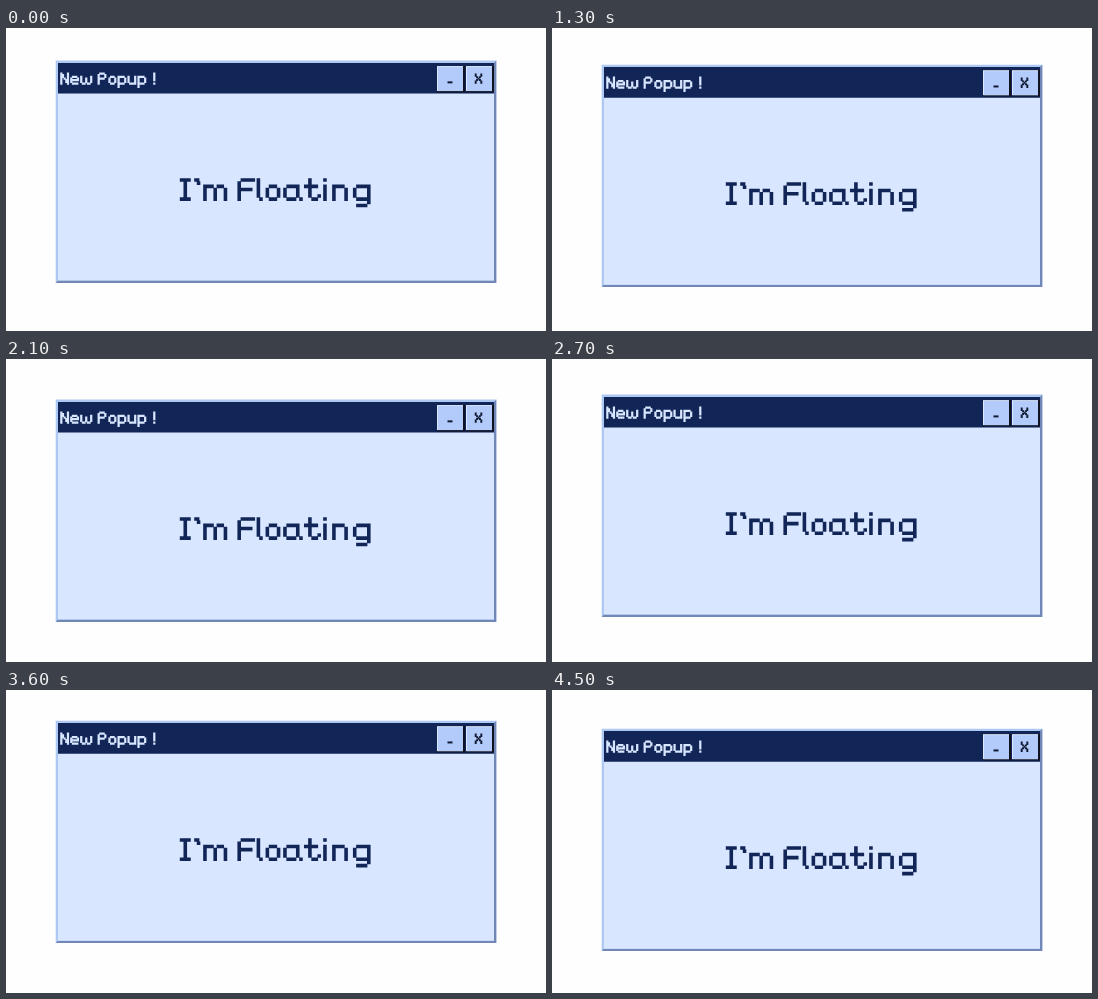
These frames come from a looping animation (540x303 px, 4.6 s). An HTML page:

```html
<!DOCTYPE html>
<html lang="en">
<head>
<meta charset="utf-8">
<title>Floating popup</title>
<style>
  html, body { margin: 0; width: 100%; height: 100%; overflow: hidden; background: #fefefe; }
  svg { display: block; width: 100%; height: 100%; }
  .pixels { fill: none; stroke-linecap: square; }
  /* selectable text lying over the pixel lettering */
  text { font-family: "DejaVu Sans Mono", monospace; fill: transparent; }
</style>
</head>
<body>
<svg viewBox="0 0 540 303">
  <g id="popup">
    <path fill="#aec8f4" d="M49.7 0h440.6v222.4h-440.6z"/>
    <path fill="#7188b6" d="M490.3 0v222.4h-440.6l2.3-2.4h436v-217.6z"/>
    <path fill="#d8e6ff" d="M52 2.4h436v217.6h-436z"/>
    <path fill="#112557" d="M52 2.4h436v30.6h-436z"/>
    <g id="buttons"></g>
    <path fill="#111a33" d="M441.5 20.8h5v2h-5z"/>
    <g id="lettering"></g>
    <text x="54" y="23.5" font-size="14.5">New Popup !</text>
    <text x="174" y="140.5" font-size="26.5">I’m Floating</text>
  </g>
</svg>
<script>
  // Pixel font: [width, strokes]; row 0 is the cap line, row 6 the baseline
  const font = {
    I: [3.5, "M0 0h2.3M0 6h2.3M1.15 0v6"],
    "’": [1.8, "M0 0h.5M.8 1h0"],
    F: [5, "M1 0h3.4M0 1v5M1 3h2.6"],
    N: [5, "M0 0v6M4 0v6M1 1v1M2 3h0M3 4v1"],
    P: [5.5, "M1 0h2M0 1v5M4 1v1M1 3h2"],
    X: [5, "M0 0v1M4 0v1M1 2h0M3 2h0M2 3h0M1 4h0M3 4h0M0 5v1M4 5v1"],
    a: [5.5, "M1 2h3M0 3v2M1 6h2M4 2v3M5 6h0"],
    e: [5, "M1 2h2M0 3v2M4 3v1M1 4h3M1 6h2.6"],
    g: [5.5, "M1 2h3.4M0 3v2M1 6h3M4.4 2v5M1 8h2.4"],
    i: [1.8, "M0 0h0M0 2v4"],
    l: [1.8, "M0 0v5M.8 6h0"],
    m: [7.2, "M0 2v4M1 2h1.2M3.2 3v3M4.2 2h1.2M6.4 3v3"],
    n: [5.5, "M0 2v4M1 2h1.8M3.8 3v3"],
    o: [4.5, "M1 2h1.5M1 6h1.5M0 3v2M3.5 3v2"],
    p: [5, "M0 2v6M1 2h2M4 3v2M1 6h2"],
    t: [5, "M1.3 0v5M0 2h3.3M2.3 6h1M4.2 5h0"],
    u: [5, "M0 2v3M1 6h2M4 2v4"],
    w: [7, "M0 2v3M1 6h1M3 3v2M4 6h1M6 2v3"],
    "!": [2, "M1 0v4M1 6h0"],
    " ": [1.5, ""]
  };

  function letters(text, x, y, cell, weight, color) {
    let pen = 0.5;
    const glyphs = [...text].map(char => {
      const [width, strokes] = font[char];
      const path = `<path transform="translate(${pen} .5)" d="${strokes}"/>`;
      pen += width + 1;
      return path;
    }).join("");
    return `<g class="pixels" stroke="${color}" stroke-width="${weight}"
      transform="translate(${x} ${y}) scale(${cell})">${glyphs}</g>`;
  }

  const button = x => `<g transform="translate(${x} 5.5)">
    <path fill="#10131f" d="M0 0h28v26.3h-28z"/>
    <path fill="#dce8ff" d="M0 0h26v25h-26z"/>
    <path fill="#b3cbfb" d="M1 1h25v24h-25z"/></g>`;

  const byId = id => document.getElementById(id);
  byId("buttons").innerHTML = button(431) + button(460);
  byId("lettering").innerHTML =
    letters("New Popup !", 54.5, 12.2, 1.66, 1.35, "#d8e6ff") +
    letters("I’m Floating", 174, 117.8, 3.2, 1.12, "#112557") +
    letters("X", 469, 13.2, 1.4, 1.4, "#111a33");

  const loop = 4600, step = 100, period = 3000;
  const popup = byId("popup");

  function draw(now) {
    const time = Math.floor(now % loop / step) * step;
    const phase = 2 * Math.PI * (time - 450) / period;
    const top = 35.6 - 5.2 * Math.cos(phase);
    popup.setAttribute("transform", `translate(0 ${top})`);
    requestAnimationFrame(() => draw(performance.now() - start));
  }

  const start = performance.now();
  draw(0);
</script>
</body>
</html>
```
